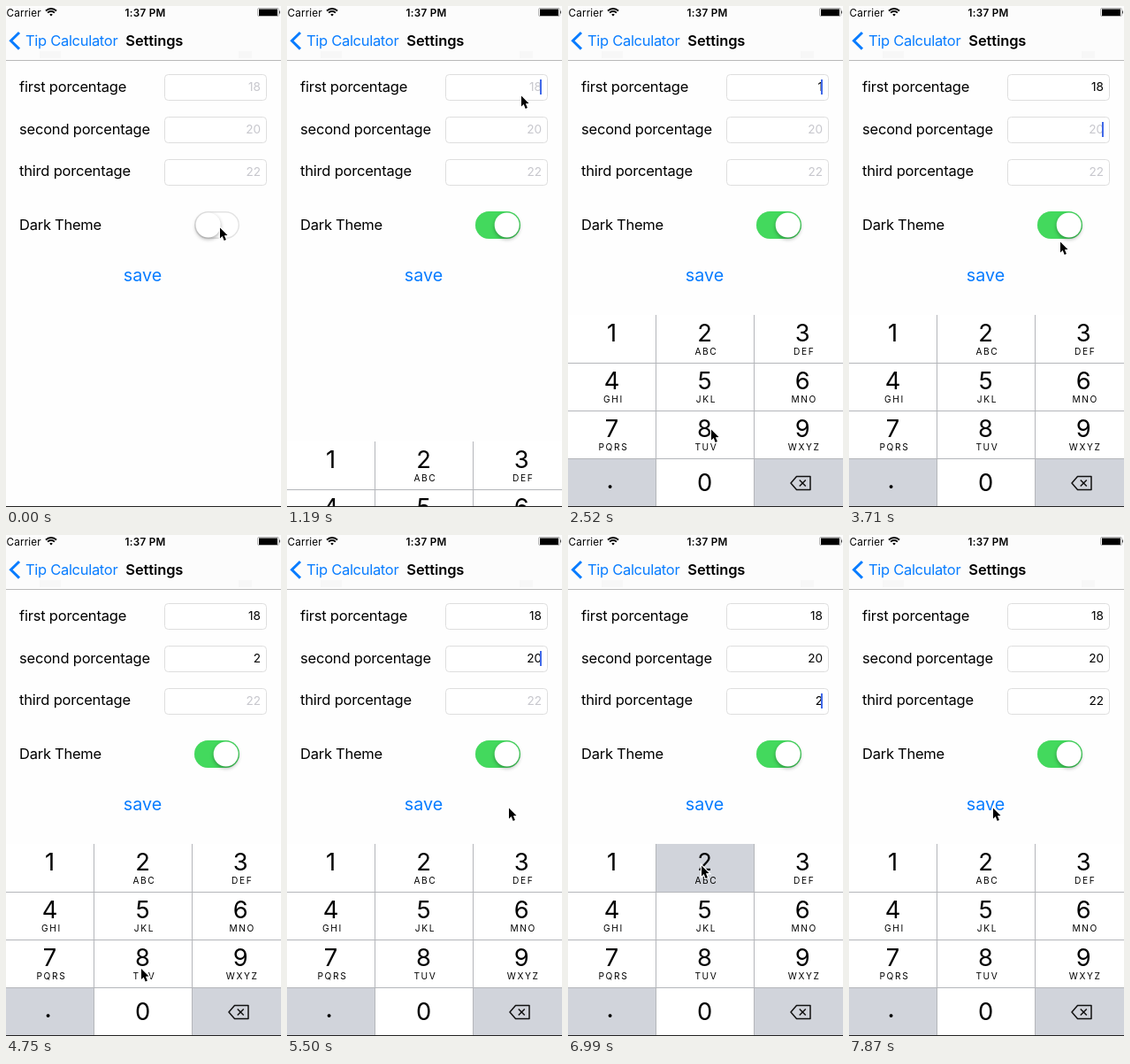
These frames come from a looping animation (311 by 566 pixels, 8 s). An HTML page with a canvas:

```html
<!DOCTYPE html>
<html lang="en">
<head>
<meta charset="utf-8">
<title>Tip settings</title>
<style>
  html, body { margin: 0; width: 100%; height: 100%; overflow: hidden; background: #fff; }
  canvas { display: block; width: 311px; height: 566px; }
</style>
</head>
<body>
<canvas id="stage"></canvas>
<script>
const W = 311, H = 566, LOOP = 8000, TICK = 148.1, LAST_TICK = 53;
const BLUE = '#087cff', GREY = '#d1d4db', LINE = '#b4b6ba';
const canvas = document.getElementById('stage');
const ctx = canvas.getContext('2d');
const ratio = window.devicePixelRatio || 1;
canvas.width = W * ratio;
canvas.height = H * ratio;

// [tick, x, y] of the pointer tip
const pointerPath = [
  [0, 241, 249], [3, 241, 249], [5, 266, 150], [6, 270, 82], [7, 264, 100], [9, 264, 100],
  [12, 55, 370], [14, 52, 376], [16, 118, 505], [17, 161, 477], [19, 161, 477],
  [22, 272, 180], [23, 287, 145], [24, 280, 143], [25, 238, 265], [27, 155, 372], [28, 155, 372],
  [30, 152, 442], [31, 152, 442], [33, 152, 535], [35, 153, 533], [37, 250, 307],
  [39, 270, 193], [41, 270, 190], [44, 172, 436], [47, 150, 372], [50, 150, 372], [53, 162, 307]
];
// Each entry sets the focused field and its typed value
const edits = [
  { at: 7, field: 0, value: '' }, { at: 14, field: 0, value: '1' }, { at: 18, field: 0, value: '18' },
  { at: 24, field: 1, value: '' }, { at: 28, field: 1, value: '2' }, { at: 34, field: 1, value: '20' },
  { at: 41, field: 2, value: '' }, { at: 47, field: 2, value: '2' }, { at: 49, field: 2, value: '22' }
];
const presses = [
  { key: '1', from: 13, to: 14 }, { key: '8', from: 18, to: 18 }, { key: '2', from: 27, to: 28 },
  { key: '0', from: 33, to: 34 }, { key: '2', from: 47, to: 47 }, { key: '2', from: 49, to: 49 }
];
const fields = [
  { label: 'first porcentage', hint: '18', top: 77, base: 97 },
  { label: 'second porcentage', hint: '20', top: 125, base: 145 },
  { label: 'third porcentage', hint: '22', top: 173, base: 192 }
];
const keyRows = [
  [['1', ''], ['2', 'ABC'], ['3', 'DEF']],
  [['4', 'GHI'], ['5', 'JKL'], ['6', 'MNO']],
  [['7', 'PQRS'], ['8', 'TUV'], ['9', 'WXYZ']],
  [['.', ''], ['0', ''], ['del', '']]
];
const columns = [
  { left: 0, right: 99, mid: 49.5 }, { left: 100, right: 210, mid: 154.5 }, { left: 211, right: 311, mid: 265.3 }
];

const clamp = v => Math.max(0, Math.min(1, v));

function text(str, x, y, size, { color = '#000', align = 'left', weight = 400, spacing = 0 } = {}) {
  ctx.font = `${weight} ${size}px Inter, Roboto, sans-serif`;
  ctx.letterSpacing = spacing + 'px';
  ctx.textAlign = align;
  ctx.fillStyle = color;
  ctx.fillText(str, x, y);
}

function rect(x, y, w, h, color) {
  ctx.fillStyle = color;
  ctx.fillRect(x, y, w, h);
}

function path(points, closed) {
  ctx.beginPath();
  points.forEach(([x, y]) => ctx.lineTo(x, y));
  if (closed) ctx.closePath();
}

function stroke(color, width) {
  ctx.strokeStyle = color;
  ctx.lineWidth = width;
  ctx.stroke();
}

function roundBox(x, y, w, h, r) {
  ctx.beginPath();
  ctx.roundRect(x, y, w, h, r);
}

function drawStatusBar() {
  text('Carrier', 0.5, 11.5, 11.7, { spacing: 0.15 });
  text('1:37 PM', 157.5, 11.5, 11.7, { align: 'center', weight: 600, spacing: 0.3 });
  for (const r of [3, 6, 9]) {
    ctx.beginPath();
    ctx.arc(51, 11.5, r - 0.5, -Math.PI * 0.75, -Math.PI * 0.25);
    if (r === 3) {
      ctx.lineTo(51, 11.5);
      ctx.fillStyle = '#000';
      ctx.fill();
    } else stroke('#000', 1.8);
  }
  roundBox(284.5, 2.5, 24, 9, 1.5);
  stroke('#999', 0.7);
  rect(286, 3.5, 21, 7.5, '#000');
  rect(309, 5.5, 1, 3, '#555');
}

function drawNavigation() {
  rect(0, 0, W, 61, '#fcfcfc');
  // Content faintly showing through the translucent bar
  rect(38, 51, 24, 8, '#f7f7f7');
  rect(263, 51, 15, 8, '#f7f7f7');
  rect(0, 61, W, 1, '#b9b9b9');
  drawStatusBar();
  path([[15, 30], [5.5, 39.3], [15, 48.6]]);
  stroke(BLUE, 3);
  text('Tip Calculator', 22, 45, 16.5, { color: BLUE, spacing: -0.3 });
  text('Settings', 135.3, 45, 16.5, { weight: 600, spacing: -0.1 });
}

function drawFields(tick) {
  const done = edits.filter(e => e.at <= tick);
  const last = done[done.length - 1];
  fields.forEach((field, i) => {
    const typed = done.filter(e => e.field === i).pop();
    const value = typed ? typed.value : '';
    text(field.label, 15, field.base, 16.5, { spacing: -0.2 });
    roundBox(179.5, field.top + 0.5, 115, 29, 4);
    ctx.fillStyle = '#fff';
    ctx.fill();
    stroke('#dedede', 1);
    text(value || field.hint, 288, field.top + 19, 13.6, { color: value ? '#000' : '#c7c7cd', align: 'right' });
    if (last && last.field === i && (tick - last.at) % 7 < 4) rect(286, field.top + 6, 2, 17, '#4169e8');
  });
}

function drawSwitch(tick) {
  const on = clamp((tick - 1) / 2);
  text('Dark Theme', 15, 253, 16.5, { spacing: -0.25 });
  roundBox(213.7, 232.7, 49.6, 29.6, 14.8);
  ctx.fillStyle = '#fff';
  ctx.fill();
  stroke('#e3e3e3', 1.4);
  ctx.save();
  ctx.globalAlpha = on;
  roundBox(213, 232, 51, 31, 15.5);
  ctx.fillStyle = '#43d95d';
  ctx.fill();
  ctx.restore();
  ctx.save();
  ctx.shadowColor = 'rgba(0,0,0,.32)';
  ctx.shadowBlur = 4 * ratio;
  ctx.shadowOffsetY = 2 * ratio;
  ctx.beginPath();
  ctx.arc(228.7 + 20 * on, 247.5, 14, 0, Math.PI * 2);
  ctx.fillStyle = '#fff';
  ctx.fill();
  ctx.restore();
}

function drawDelete(x, y) {
  ctx.lineJoin = 'round';
  path([[x - 11, y], [x - 4.5, y - 7.5], [x + 11, y - 7.5], [x + 11, y + 7.5], [x - 4.5, y + 7.5]], true);
  stroke('#111', 1.5);
  for (const s of [-1, 1]) {
    path([[x - 1.2, y - 3.5 * s], [x + 5.8, y + 3.5 * s]]);
    stroke('#111', 1.5);
  }
  ctx.lineJoin = 'miter';
}

function drawKeyboard(tick) {
  if (tick < 8) return;
  const top = 349 + ([143, 22][tick - 8] || 0);
  const pressed = presses.find(p => tick >= p.from && tick <= p.to);
  rect(0, top, W, 217, '#fff');
  keyRows.forEach((row, r) => row.forEach(([digit, letters], c) => {
    const { left, right, mid } = columns[c];
    const y = top + r * 54;
    const special = digit === '.' || digit === 'del';
    const held = pressed && pressed.key === digit;
    if (special || held) rect(left, y, right - left, 54, GREY);
    if (digit === 'del') drawDelete(263, y + 28);
    else if (digit === '.') text('.', 47.5, y + 34, 27, { align: 'center', weight: 500 });
    else text(digit, mid, y + (r === 3 ? 37 : 30), 27.3, { align: 'center' });
    if (letters) text(letters, mid + 1.9, y + 45, 10.2, { align: 'center', spacing: 1.6 });
  }));
  for (const x of [99, 210]) rect(x, top, 1, 217, LINE);
  for (const r of [1, 2, 3]) rect(0, top + r * 54, W, 1, LINE);
}

function drawPointer(tick) {
  const next = Math.max(1, pointerPath.findIndex(p => p[0] >= tick));
  const [t0, x0, y0] = pointerPath[next - 1];
  const [t1, x1, y1] = pointerPath[next];
  const k = (tick - t0) / (t1 - t0);
  ctx.save();
  ctx.translate(x0 + (x1 - x0) * k + 0.5, y0 + (y1 - y0) * k + 1.5);
  path([[0.5, 0], [0.5, 12], [3.2, 9.6], [5.2, 14.4], [7.4, 13.5], [5.4, 8.8], [9, 8.6]], true);
  stroke('#fff', 2.4);
  ctx.fillStyle = '#000';
  ctx.fill();
  ctx.restore();
}

function render(now) {
  const tick = Math.min(LAST_TICK, Math.floor((now % LOOP) / TICK));
  ctx.setTransform(ratio, 0, 0, ratio, 0, 0);
  rect(0, 0, W, H, '#fefefe');
  drawNavigation();
  drawFields(tick);
  drawSwitch(tick);
  text('save', 154.5, 311, 19.7, { color: BLUE, align: 'center' });
  drawKeyboard(tick);
  rect(0, 565, W, 1, '#222');
  drawPointer(tick);
}

const start = performance.now();
function loop() {
  render(performance.now() - start);
  requestAnimationFrame(loop);
}
loop();
</script>
</body>
</html>
```
